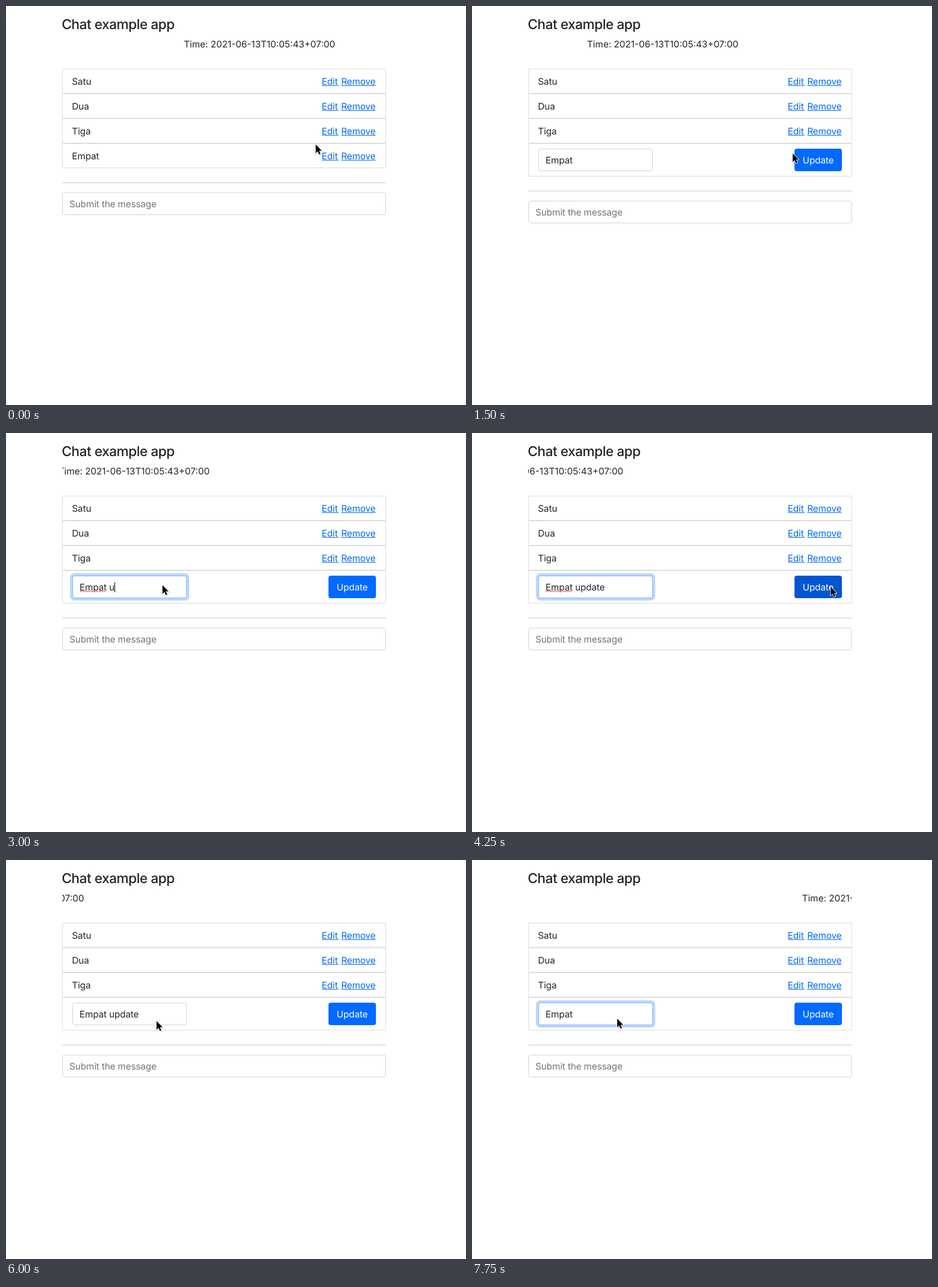
Recreate the animation shown at these times as an HTML page. Size 776 by 674 pixels, loop 8 s.

```html
<!DOCTYPE html>
<html lang="en">
<head>
<meta charset="utf-8">
<title>Chat example app</title>
<style>
  html, body { margin: 0; width: 100%; height: 100%; overflow: hidden; background: #fff; }
  svg { display: block; width: 776px; height: 674px; }
  text {
    font: 15.5px Inter, "Liberation Sans", sans-serif;
    font-optical-sizing: none;
    letter-spacing: -0.13px;
    text-rendering: geometricPrecision;
    white-space: pre;
    fill: #212529;
  }
  #title { font-size: 23px; font-weight: 500; letter-spacing: -0.5px; }
  #clock { letter-spacing: 0; }
  .link { fill: #0068fa; }
  .line { fill: #dcdddd; }
  .field { fill: #fff; stroke: #ced4da; }
  .field.focus { stroke: #86b7fe; }
  .hint { fill: #6c757d; }
  #button { fill: #0069ff; }
  #button.hover { fill: #0056d0; }
  #buttonLabel { fill: #fff; }
</style>
</head>
<body>
<svg viewBox="0 0 776 674">
  <defs><clipPath id="lane"><rect x="95" y="54" width="546" height="26"/></clipPath></defs>
  <text id="title" x="94" y="39">Chat example app</text>
  <g clip-path="url(#lane)"><text id="clock" y="70">Time: 2021-06-13T10:05:43+07:00</text></g>
  <g id="rows"></g>
  <g id="editor">
    <path d="M95.5 232.5H640.5V287.5H95.5Z" fill="none" stroke="#dcdddd"/>
    <rect id="ring" x="108" y="237" width="201" height="46" rx="7" fill="#b9d7fd"/>
    <rect id="input" class="field" x="112.5" y="241.5" width="192" height="37" rx="3.5"/>
    <text id="draft" x="124" y="266"></text>
    <path id="spelling" d="M125.5 267.5H168" fill="none" stroke="#f4483f" stroke-width="1.8" stroke-linecap="round" stroke-dasharray="0.3 2.6"/>
    <rect id="caret" y="252" width="1" height="17"/>
    <rect id="button" x="544" y="241" width="80" height="38" rx="4"/>
    <text id="buttonLabel" x="584" y="266" text-anchor="middle">Update</text>
  </g>
  <g id="footer">
    <rect x="95" y="298" width="546" height="1" fill="#c8c9ca"/>
    <rect class="field" x="95.5" y="315.5" width="545" height="37" rx="3.5"/>
    <text class="hint" x="107" y="340">Submit the message</text>
  </g>
  <g id="cursor">
    <path d="M0 0V14.5L3.3 11.5L5.7 16.8L8 15.7L5.7 10.6H10.2Z" transform="translate(.6 1.4)" fill="#000" stroke="#000" stroke-width="2" opacity=".13"/>
    <path d="M0 0V14.5L3.3 11.5L5.7 16.8L8 15.7L5.7 10.6H10.2Z" fill="#000" stroke="#fff" stroke-width="1.6" paint-order="stroke" stroke-linejoin="round"/>
  </g>
</svg>
<script>
const LOOP = 8000, STEP = 250;
const LANE = { left: 95, right: 641, textWidth: 258, start: 300, speed: 0.0706 };
const $ = id => document.getElementById(id);

// Pointer stops: time, x, y
const pointer = [
  [0, 522.5, 234], [250, 529, 240], [500, 538, 248], [750, 540, 249], [1500, 541, 249],
  [1750, 440, 266], [2000, 314, 276], [2250, 270, 262], [2500, 264, 257], [3500, 264, 257],
  [3750, 543, 262], [4000, 600, 262], [4250, 605, 260], [4500, 605, 260], [5000, 548, 250],
  [5250, 541, 249], [5500, 541, 249], [5750, 380, 265], [6000, 254, 272], [6250, 245, 268]
];

// Text of the last message: time, content
const drafts = [
  [0, "Empat"], [2750, "Empat "], [3000, "Empat u"], [3250, "Empat upda"], [3500, "Empat update"],
  [6750, "Empat updat"], [7000, "Empat upd"], [7250, "Empat u"], [7500, "Empat "], [7750, "Empat"]
];

const within = (t, ...spans) => spans.some(([from, to]) => t >= from && t < to);
const show = (id, on) => $(id).setAttribute("display", on ? "inline" : "none");

function row(label, i) {
  const y = 106 + 42 * i;
  return `<g id="row${i}">
    <path d="M95.5 ${y + 0.5}H640.5V${y + 41.5}H95.5Z" fill="none" stroke="#dcdddd"/>
    <text x="111.3" y="${y + 27}">${label}</text>
    <text class="link" x="532.5" y="${y + 27}">Edit</text>
    <text class="link" x="623.5" y="${y + 27}" text-anchor="end">Remove</text>
    <path class="link" d="M533 ${y + 28}h28v1h-28zM565.5 ${y + 28}h58v1h-58z"/>
  </g>`;
}

function pointerAt(t) {
  const next = pointer.findIndex(stop => stop[0] > t);
  if (next < 0) return pointer.at(-1).slice(1);
  const [t0, x0, y0] = pointer[next - 1], [t1, x1, y1] = pointer[next];
  const k = (t - t0) / (t1 - t0);
  return [x0 + (x1 - x0) * k, y0 + (y1 - y0) * k];
}

function clockX(t) {
  const x = LANE.start - LANE.speed * t;
  const exit = LANE.left - LANE.textWidth;
  return x < exit ? x + LANE.right - exit : x;
}

function draw(t) {
  const editing = within(t, [1500, 4500], [5500, LOOP]);
  const focused = within(t, [2500, 4500], [6250, LOOP]);
  const message = drafts.findLast(entry => entry[0] <= t)[1];

  $("clock").setAttribute("x", clockX(t));
  show("row3", !editing);
  show("editor", editing);
  $("footer").setAttribute("transform", `translate(0 ${editing ? 14 : 0})`);

  lastLabel.textContent = message;
  $("draft").textContent = message;
  show("ring", focused);
  $("input").classList.toggle("focus", focused);
  show("spelling", within(t, [2750, 4500], [6750, 7750]));
  show("caret", within(t, [2500, 4250], [6250, 7750]));
  if (editing) $("caret").setAttribute("x", Math.round(124 + $("draft").getComputedTextLength()));
  $("button").classList.toggle("hover", within(t, [4000, 4500]));
  $("cursor").setAttribute("transform", `translate(${pointerAt(t)})`);
}

$("rows").innerHTML = ["Satu", "Dua", "Tiga", "Empat"].map(row).join("");
const lastLabel = document.querySelector("#row3 text");

const began = performance.now();
function tick() {
  const t = (performance.now() - began) % LOOP;
  draw(Math.floor(t / STEP) * STEP);
  requestAnimationFrame(tick);
}
tick();
</script>
</body>
</html>
```
